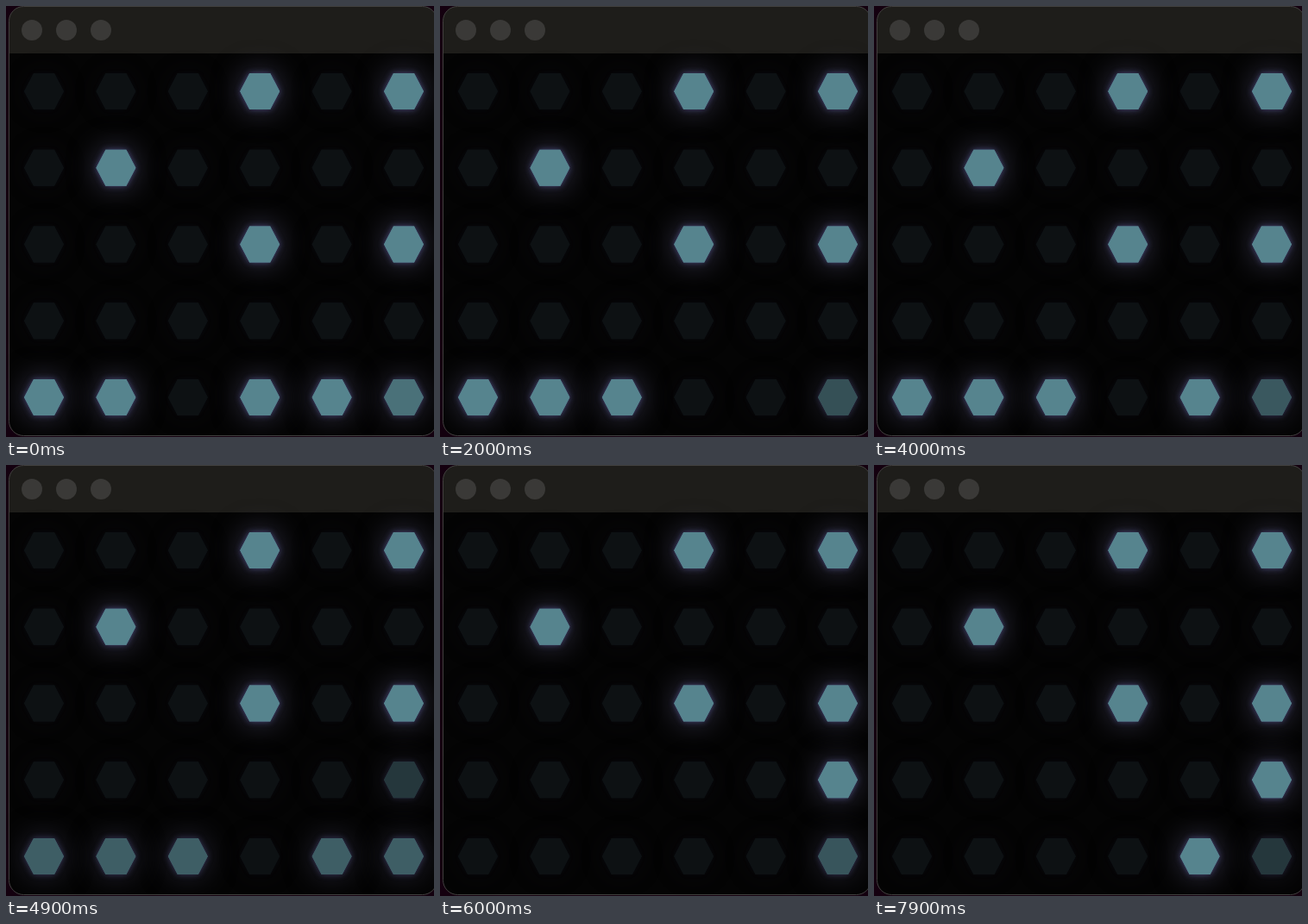
An HTML page with a canvas that plays this animation: 496 px wide and 500 px high, repeating every 8000 ms.

```html
<!DOCTYPE html>
<html lang="en">
<head>
<meta charset="utf-8">
<title>Binary clock</title>
<style>
  html, body { margin: 0; width: 100%; height: 100%; overflow: hidden; background: #14000f; }
  canvas { display: block; width: 496px; height: 500px; }
</style>
</head>
<body>
<canvas id="stage" width="496" height="500"></canvas>
<script>
const ctx = document.getElementById('stage').getContext('2d');
const LOOP = 8000, FADE = 700;
// Start of each second, in ms; the first one began before the loop.
const TICKS = [-370, 780, 1780, 2750, 3750, 4750, 5760, 6760, 7750];
const FIRST = 55;
const OFF = [13, 17, 19], ON = [86, 132, 142];

// Month, day, hour, minute and second, one binary row each.
const rowsAt = n => [5, 16, 5, n < 60 ? 0 : 1, n % 60];

// The CSS "ease" curve.
function ease(x) {
  const bez = (u, a, b) => 3 * (1 - u) ** 2 * u * a + 3 * (1 - u) * u * u * b + u ** 3;
  if (x <= 0) return 0;
  if (x >= 1) return 1;
  let lo = 0, hi = 1;
  for (let i = 0; i < 20; i++) {
    const mid = (lo + hi) / 2;
    if (bez(mid, .25, .25) < x) lo = mid; else hi = mid;
  }
  return bez(lo, .1, 1);
}

const mix = p => `rgb(${OFF.map((v, i) => Math.round(v + (ON[i] - v) * p))})`;

function hexPath(x, y) {
  ctx.beginPath();
  [[-23, 0], [-12, -21], [12, -21], [23, 0], [12, 21], [-12, 21]]
    .forEach(([dx, dy]) => ctx.lineTo(x + dx, y + dy));
  ctx.closePath();
}

function glow(color, blur) {
  ctx.shadowColor = color;
  ctx.shadowBlur = blur;
  ctx.fill();
}

function cell(x, y, p) {
  ctx.save();
  hexPath(x, y);
  ctx.fillStyle = mix(p);
  glow(`rgba(62,60,84,${.12 + .88 * p})`, 34);
  glow(`rgba(84,84,140,${.05 + .75 * p})`, 7);
  ctx.restore();
}

function windowFrame() {
  ctx.fillStyle = '#14000f';
  ctx.fillRect(0, 0, 496, 500);
  ctx.save();
  ctx.beginPath();
  ctx.roundRect(3.5, .5, 496, 498, 17);
  ctx.fillStyle = '#040404';
  ctx.fill();
  ctx.clip();
  ctx.fillStyle = '#1e1d1a';
  ctx.fillRect(0, 0, 496, 55);
  ctx.restore();
  ctx.strokeStyle = '#42403f';
  ctx.lineWidth = 1;
  ctx.stroke();
  ctx.fillStyle = '#3a3937';
  for (const x of [30, 70, 110]) {
    ctx.beginPath();
    ctx.arc(x, 28, 12, 0, Math.PI * 2);
    ctx.fill();
  }
}

function draw(t) {
  let i = TICKS.length - 1;
  while (TICKS[i] > t) i--;
  const p = ease((t - TICKS[i]) / FADE);
  const now = rowsAt(FIRST + i), before = rowsAt(FIRST + i - 1);
  windowFrame();
  for (let r = 0; r < 5; r++) {
    for (let c = 0; c < 6; c++) {
      const on = now[r] >> (5 - c) & 1, was = before[r] >> (5 - c) & 1;
      cell(44 + c * 83.4, 99 + r * 88.75, was + (on - was) * p);
    }
  }
}

const start = performance.now();
function frame() {
  draw((performance.now() - start) % LOOP);
  requestAnimationFrame(frame);
}
frame();
</script>
</body>
</html>
```
